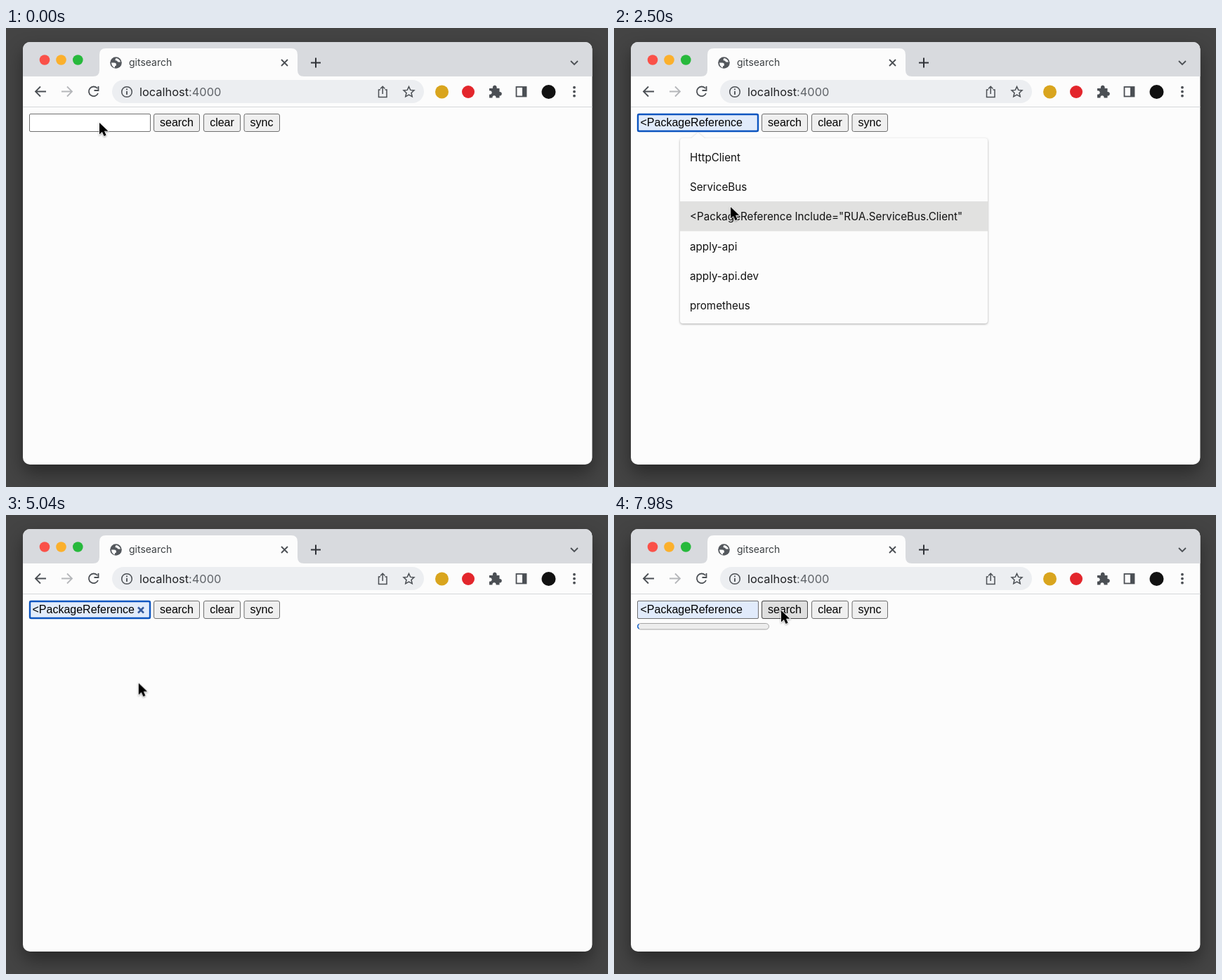
An HTML page for the animation above (8000 ms loop, 857 by 654 pixels).

```html
<!DOCTYPE html>
<html lang="en">
<head>
<meta charset="utf-8">
<title>gitsearch</title>
<style>
html, body { margin: 0; width: 100%; height: 100%; overflow: hidden; background: #444; }
svg { display: block; width: 857px; height: 654px; }
text { font: 15.2px Inter, "Open Sans", sans-serif; fill: #111; }
.form text { font: 16px "Liberation Sans", Arial, sans-serif; fill: #000; }
.tab-title { font-size: 14px; fill: #3c4043; }
.url { font-size: 16.4px; fill: #202124; }
.url tspan { fill: #5f6368; }
.line { fill: none; stroke: #4b4f54; stroke-width: 1.8; }
.box { fill: #efefef; stroke: #6f6f6f; }
.window { filter: drop-shadow(0 12px 13px rgba(0,0,0,.4)); }
.popup-box { filter: drop-shadow(0 1px 1.5px rgba(0,0,0,.32)); }

/* Hard switches, one 8 s loop */
.state { opacity: 0; animation: 8s step-end infinite; }
.focus { animation-name: focus; }
.popup { animation-name: popup; }
.caret { animation-name: caret; }
.filled { animation-name: filled; }
.first { animation-name: first; }
.second { animation-name: second; }
.third { animation-name: third; }
.value { animation-name: value; }
.clear { animation-name: clear; }
.hover { animation-name: hover; }
.loading { animation-name: loading; }
.beam { animation-name: beam; }
.arrow { animation-name: arrow; }
@keyframes focus { 0% { opacity: 0 } 5% { opacity: 1 } 86.25%, 100% { opacity: 0 } }
@keyframes popup { 0% { opacity: 0 } 5% { opacity: 1 } 43.125%, 100% { opacity: 0 } }
@keyframes caret { 0% { opacity: 0 } 5% { opacity: 1 } 11.25% { opacity: 0 } 17.5% { opacity: 1 } 21.25%, 100% { opacity: 0 } }
@keyframes filled { 0% { opacity: 0 } 21.25%, 100% { opacity: 1 } }
@keyframes first { 0% { opacity: 0 } 21.25% { opacity: 1 } 27.8%, 100% { opacity: 0 } }
@keyframes second { 0% { opacity: 0 } 27.8% { opacity: 1 } 31.25%, 100% { opacity: 0 } }
@keyframes third { 0% { opacity: 0 } 31.25% { opacity: 1 } 43.125%, 100% { opacity: 0 } }
@keyframes value { 0% { opacity: 0 } 31.25%, 100% { opacity: 1 } }
@keyframes clear { 0% { opacity: 0 } 43.125% { opacity: 1 } 86.25%, 100% { opacity: 0 } }
@keyframes hover { 0% { opacity: 0 } 73.75%, 100% { opacity: 1 } }
@keyframes loading { 0% { opacity: 0 } 86.25%, 100% { opacity: 1 } }
@keyframes beam { 0% { opacity: 0 } 1.25% { opacity: 1 } 18.5% { opacity: 0 } 43.125% { opacity: 1 } 58.75%, 100% { opacity: 0 } }
@keyframes arrow { 0% { opacity: 1 } 1.25% { opacity: 0 } 18.5% { opacity: 1 } 43.125% { opacity: 0 } 58.75%, 100% { opacity: 1 } }

.pointer { animation: travel 8s linear infinite; }
@keyframes travel {
  0%, 16.9% { transform: translate(133px, 135px) }
  21.9% { transform: translate(142px, 172px) }
  26.5% { transform: translate(154px, 211px) }
  31.25% { transform: translate(166px, 255px) }
  34.4%, 57.5% { transform: translate(169px, 269px) }
  62.5% { transform: translate(185px, 245px) }
  67.5% { transform: translate(222px, 192px) }
  71.5% { transform: translate(240px, 161px) }
  75.6%, 100% { transform: translate(238px, 136px) }
}
</style>
</head>
<body>
<svg viewBox="0 0 857 654">
  <defs>
    <clipPath id="frame"><rect x="24" y="20" width="810.5" height="602" rx="10"/></clipPath>
  </defs>
  <rect width="857" height="654" fill="#444"/>
  <rect class="window" x="24" y="20" width="810.5" height="602" rx="10" fill="#fcfcfc"/>

  <g clip-path="url(#frame)">
    <rect x="24" y="20" width="811" height="49" fill="#d8dade"/>
    <path d="M124 69q9 0 9-9V38q0-9 9-9h264q9 0 9 9v22q0 9 9 9z" fill="#fcfcfc"/>
    <path d="M24 112.5h811" stroke="#d5d7da"/>
  </g>
  <circle cx="55" cy="45.500" r="7.300" fill="#fa5149"/>
  <circle cx="78.500" cy="45.500" r="7.300" fill="#fbb02c"/>
  <circle cx="102.300" cy="45.500" r="7.300" fill="#27b93c"/>

  <g transform="translate(156.500 49.500)">
    <circle r="8.300" fill="#54585d"/>
    <path d="M-6.500 0h4q3 0 3 2.500t-2 2.200v2.200Q-6 6-6.500 0zM0-6.500q5 .5 6.500 5.500H3q-1-2.500-4-2.500 0-1.500 1-3z" fill="#fcfcfc"/>
  </g>
  <text class="tab-title" x="175" y="54">gitsearch</text>
  <g class="line">
    <path d="M392 45l9 9M401 45l-9 9"/>
    <path d="M434 49.500h14M441 42.500v14" stroke="#303338" stroke-width="2"/>
    <path d="M804 47l5 5 5-5"/>
    <path d="M57 90.500H42M49 83.500l-7 7 7 7"/>
    <path d="M79 90.500h15M87 83.500l7 7-7 7" stroke="#b5b7ba"/>
    <path d="M130 86a6.800 6.800 0 1 0 1 7M131.500 83v6h-6"/>
  </g>

  <rect x="151" y="74" width="444" height="33" rx="16.500" fill="#eceef1"/>
  <g class="line" stroke-width="1.500">
    <circle cx="172" cy="91" r="7.300" style="stroke-width:1.500"/>
    <path d="M172 90v5M172 86.500v1.700"/>
    <path d="M533 88h-2.500v10.500h11.500V88h-2.500M536.200 94V83.500M533 86.500l3.200-3.200 3.200 3.200" style="stroke-width:1.500"/>
    <path d="M573.500 83.500l2.200 4.900 5.300.5-4 3.600 1.200 5.300-4.700-2.800-4.700 2.800 1.200-5.300-4-3.600 5.300-.5z" style="stroke-width:1.500"/>
    <rect x="726.500" y="84" width="14" height="13.500"/>
  </g>
  <text class="url" x="190" y="96.500">localhost<tspan>:4000</tspan></text>

  <circle cx="620.500" cy="91" r="9.500" fill="#d9a51e"/>
  <circle cx="658" cy="91" r="9" fill="#e3262c"/>
  <path d="M688 86h5a3 3 0 1 1 5.500 0h4v5a2.800 2.800 0 1 1 0 5.500v3h-5a2.600 2.600 0 1 0-5 0H688v-5a2.700 2.700 0 1 0 0-5z" fill="#4b4f54"/>
  <rect x="735" y="84" width="6" height="13.500" fill="#4b4f54"/>
  <circle cx="772.500" cy="91" r="10" fill="#111"/>
  <g fill="#4b4f54">
    <circle cx="809" cy="84.700" r="1.900"/>
    <circle cx="809" cy="90.700" r="1.900"/>
    <circle cx="809" cy="96.700" r="1.900"/>
  </g>

  <g class="form">
    <rect x="33.500" y="122.500" width="172" height="25" rx="1.500" fill="#fff" stroke="#707070"/>
    <rect class="state filled" x="33.500" y="122.500" width="172" height="25" rx="1.500" fill="#e1ebfb" stroke="#707070"/>
    <rect class="state focus" x="34" y="123" width="171" height="24" rx="2" fill="none" stroke="#0c55c0" stroke-width="2.400"/>
    <path class="state caret" d="M38.500 126v18" stroke="#000"/>
    <text class="state first" x="37.500" y="140">HttpClient</text>
    <text class="state second" x="37.500" y="140">ServiceBus</text>
    <text class="state value" x="37.500" y="140">&lt;PackageReference</text>
    <path class="state clear" d="M188 131.500l8 8M196 131.500l-8 8" stroke="#355a9d" stroke-width="2.500"/>

    <rect class="box" x="210.500" y="122.500" width="65" height="25" rx="2.500"/>
    <rect class="state hover" x="210.500" y="122.500" width="65" height="25" rx="2.500" fill="#dedede" stroke="#484848"/>
    <rect class="box" x="281.500" y="122.500" width="52" height="25" rx="2.500"/>
    <rect class="box" x="339" y="122.500" width="50.500" height="25" rx="2.500"/>
    <g text-anchor="middle">
      <text x="243" y="140">search</text>
      <text x="307.500" y="140">clear</text>
      <text x="364" y="140">sync</text>
    </g>
  </g>

  <g class="state loading">
    <rect x="33.500" y="154.500" width="187" height="8.500" rx="4.250" fill="#ededed" stroke="#a5a5a5"/>
    <path d="M35.500 155.500q-3.500 3.200 0 6.500" fill="none" stroke="#1767d2" stroke-width="1.500"/>
  </g>

  <g class="state popup">
    <path class="popup-box" d="M98 157h12l9.500-8 9.500 8h399q4 0 4 4v256q0 4-4 4H98q-4 0-4-4V161q0-4 4-4z" fill="#fcfcfc"/>
    <g fill="#e1e1e0">
      <rect class="state first" x="94" y="162" width="438" height="42.500"/>
      <rect class="state second" x="94" y="204.500" width="438" height="42.500"/>
      <rect class="state third" x="94" y="247" width="438" height="42.500"/>
    </g>
    <text x="108" y="189.500">HttpClient</text>
    <text x="108" y="232">ServiceBus</text>
    <text x="108" y="274">&lt;PackageReference Include="RUA.ServiceBus.Client"</text>
    <text x="108" y="316.500">apply-api</text>
    <text x="108" y="359">apply-api.dev</text>
    <text x="108" y="401">prometheus</text>
  </g>

  <g class="pointer">
    <path class="state arrow" d="M0 0v16.500l3.900-3.600 2.700 6.100 3-1.300L7 11.700h5.300z" stroke="#fff" stroke-width="1.500" paint-order="stroke" style="filter:drop-shadow(0 1px 1px #0005)"/>
    <path class="state beam" d="M-4-9Q0-9 0-6 0-9 4-9M0-6V7M-4 10Q0 10 0 7 0 10 4 10M-2.500 1h5" fill="none" stroke="#111" stroke-width="1.500"/>
  </g>
</svg>
</body>
</html>
```
